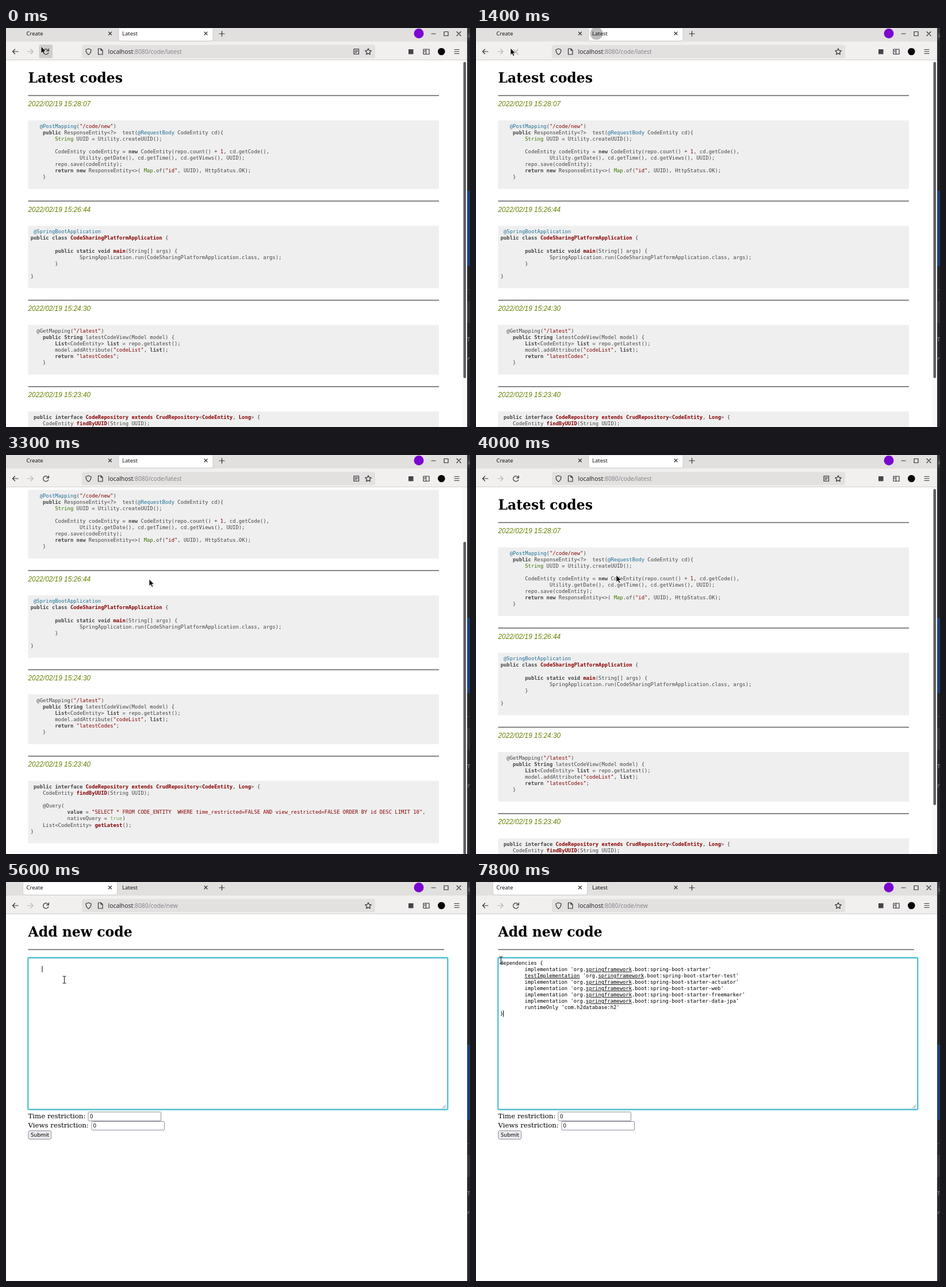
These frames come from a looping animation (807x694 px, 8000 ms). An HTML page:

```html
<!DOCTYPE html>
<html lang="en">
<head>
<meta charset="utf-8">
<title>Latest codes</title>
<style>
html, body { margin: 0; width: 100%; height: 100%; overflow: hidden; background: #fff; }
svg { display: block; width: 807px; height: 694px; }
text { white-space: pre; }
.ui { font: 9.45px "Noto Sans", "Open Sans", sans-serif; fill: #15141a; }
.url { font-size: 10.35px; fill: #85858a; }
.btn { font-size: 9.6px; fill: #000; }
.h1 { font: bold 23.5px "DejaVu Serif", serif; }
.label { font: 11.78px "DejaVu Serif", serif; }
.date { font: italic 11.85px "Liberation Sans", Arial, sans-serif; fill: #658200; }
.code { font: 8.86px "DejaVu Sans Mono", monospace; fill: #444; }
.area { fill: #000; }
.k, .t { font-weight: bold; }
.t, .s { fill: #800; }
.m { fill: #1f7199; }
.u { fill: #397300; }
.l { fill: #78a960; }
.w { text-decoration: underline wavy #e0202a 1px; text-decoration-skip-ink: none; text-underline-offset: 1px; }
.icon { fill: none; stroke: #333238; stroke-width: 1.2; stroke-linejoin: round; stroke-linecap: round; }
.field { fill: #fff; stroke: #8f8f9d; }
</style>
</head>
<body>
<svg viewBox="0 0 807 694">
  <rect width="807" height="694" fill="#fff"/>

  <g id="latest">
    <g id="posts"><text class="h1" x="38.5" y="94.5">Latest codes</text></g>
    <rect x="793" y="56" width="9" height="638" fill="#f9f9fa"/>
    <rect id="thumb" x="795.5" y="59" width="4.5" height="550" rx="2.2" fill="#5d5d62"/>
  </g>

  <g id="create">
    <text class="h1" x="38.5" y="94.5">Add new code</text>
    <path d="M38.5 117.6H762" stroke="#5c615e" stroke-width="1.5"/>
    <rect x="38.5" y="132" width="729.5" height="263.5" rx="1.5" fill="none" stroke="#b9f1f8" stroke-width="4.5"/>
    <rect x="38.5" y="132" width="729.5" height="263.5" rx="1.5" fill="#fff" stroke="#1fa5bc" stroke-width="1.4"/>
    <path d="M759 393.500l6-6m-3 6l3-3" stroke="#777" fill="none"/>
    <g id="pasted"></g>
    <rect id="caret" width="1" height="11"/>
    <text class="label" x="38.5" y="411">Time restriction:</text>
    <text class="label" x="38.5" y="427">Views restriction:</text>
    <rect class="field" x="143" y="400" width="126.500" height="15.500" rx="1.500"/>
    <rect class="field" x="149" y="416.500" width="126.500" height="15" rx="1.500"/>
    <text class="ui btn" x="146" y="411">0</text>
    <text class="ui btn" x="151.500" y="427">0</text>
    <rect x="38.800" y="432.600" width="40" height="14.800" rx="3" fill="#e9e9ed" stroke="#8f8f9d"/>
    <text class="ui btn" x="43" y="443">Submit</text>
  </g>

  <rect width="802" height="25" fill="#e2e0de"/>
  <rect y="23.500" width="802" height="32" fill="#f1f0ef"/>
  <path d="M0 55.500H802" stroke="#d0cfce"/>
  <path id="hover" d="M29 0H192V19q0 3.500-3.500 3.500H32.500q-3.500 0-3.500-3.500Z" fill="#cbc9c8"/>
  <path id="tab" d="M196 0H360V19q0 3.500-3.500 3.500H199.500q-3.500 0-3.500-3.500Z" fill="#fff" stroke="#c8c6c5" stroke-width=".8"/>
  <circle id="burst" cx="209.500" cy="9.500" fill="#a6a6a6"/>
  <text class="ui" x="35.500" y="13">Create</text>
  <text class="ui" x="202" y="13">Latest</text>
  <circle cx="718" cy="9.500" r="8.500" fill="#7a06cf"/>
  <g class="icon">
    <path d="M178.500 7l5 5m0-5l-5 5M345 7l5 5m0-5l-5 5M371 10h9m-4.500-4.500v9M740 10h7M762 6.500h7v7h-7zM784 6.500l7 7m0-7l-7 7"/>
  </g>

  <rect x="132" y="29.500" width="510" height="23" rx="3" fill="#e3e1e0"/>
  <text class="ui url" x="177.500" y="45"><tspan fill="#29292e">localhost</tspan><tspan id="path"></tspan></text>
  <rect id="press" x="57.500" y="29" width="23.500" height="23.500" rx="3"/>
  <g class="icon">
    <path d="M21 41H11.500m4-4l-4 4 4 4"/>
    <path d="M37.500 41H47m-4-4l4 4-4 4" stroke="#b5b4b5"/>
    <path id="reload" d="M73.800 39.500A4.700 4.700 0 1 0 73.800 43M74.300 36v3.800h-3.800"/>
    <path id="stop" d="M65 37.500l8 8m0-8l-8 8" stroke="#aaa"/>
    <path d="M143.500 36l4.500 1.700c0 4-1 6.700-4.500 8.800-3.500-2.100-4.500-4.800-4.500-8.800zM160.500 36h4.500l3 3v7h-7.500zM165 36v3h3"/>
    <path id="reader" d="M605 36.500h8.500v9H605zM607 39h4.500m-4.500 2h4.500m-4.500 2h2.500"/>
    <path d="M630 35.800l1.600 3.300 3.700.5-2.700 2.600.7 3.700-3.300-1.800-3.300 1.800.7-3.700-2.700-2.600 3.700-.5z"/>
    <path d="M726 37h10v8.500h-10zM730.500 37v8.500M727.800 39.500h1m-1 2h1M780 37.500h8m-8 3.500h8m-8 3.500h8"/>
  </g>
  <rect x="700" y="37" width="8.500" height="8.500" fill="#45444a"/>
  <circle cx="757.300" cy="41" r="6.300" fill="#08080a"/>

  <rect x="802" width="5" height="694" fill="#26282b"/>
  <path d="M802 0h5v22h-5zM802 475h5v38h-5z" fill="#34363a"/>
  <path d="M802 283h5v131h-5z" fill="#1c3f7d"/>
  <path d="M802 455h5" stroke="#44464a"/>
  <g class="code" style="fill:#8f9296"><text x="802.500" y="16">i</text><text x="802" y="545">T</text><text x="802" y="578">r</text></g>

  <path id="arrow" d="M0 0V12L2.800 9.500 4.700 13.800 6.800 12.900 4.900 8.700H8.500Z" fill="#111" stroke="#fff" stroke-width=".7"/>
  <path id="beam" d="M-3-6h2q1 0 1 1 0-1 1-1h2M0-5v10M-3 6h2q1 0 1-1 0 1 1 1h2" fill="none" stroke="#222" stroke-width="1.100"/>
</svg>

<script>
const $ = id => document.getElementById(id);
const PITCH = 11.07;

// [k keyword] [t title] [s string] [m annotation] [u built-in] [l literal] [w misspelt]
const mark = s => s.replace(/&/g, '&amp;').replace(/</g, '&lt;')
  .replace(/\[([ktsmulw]) (.*?)\]/g, '<tspan class="$1">$2</tspan>');
const codeLines = (src, x, y, cls = '') => src.split('\n').map((line, i) =>
  `<text class="code ${cls}" x="${x}" y="${y + i * PITCH}">${mark(line)}</text>`).join('');

const posts = [
['15:28:07', `   [m @PostMapping]([s "/code/new"])
    [k public] ResponseEntity<?>  test([m @RequestBody] CodeEntity cd){
        [u String] UUID = Utility.createUUID();

        CodeEntity codeEntity = [k new] CodeEntity(repo.count() + [s 1], cd.getCode(),
                Utility.getDate(), cd.getTime(), cd.getViews(), UUID);
        repo.save(codeEntity);
        [k return new] ResponseEntity<>( [u Map].of([s "id"], UUID), HttpStatus.OK);
    }
`],
['15:26:44', ` [m @SpringBootApplication]
[k public class] [t CodeSharingPlatformApplication] {

        [k public static void] [t main](String[] args) {
                SpringApplication.run(CodeSharingPlatformApplication.class, args);
        }

}
`],
['15:24:30', `  @GetMapping([s "/latest"])
    [k public String] latestCodeView(Model model) {
        [k List]<CodeEntity> [k list] = repo.getLatest();
        model.addAttribute([s "codeList"], [k list]);
        [k return] [s "latestCodes"];
    }
`],
['15:23:40', ` [k public interface] [t CodeRepository extends CrudRepository]<[t CodeEntity], [t Long]> {
    CodeEntity [t findByUUID](String UUID);

    @Query(
            [k value] = [s "SELECT * FROM CODE_ENTITY  WHERE time_restricted=FALSE AND view_restricted=FALSE ORDER BY id DESC LIMIT 10"],
            nativeQuery = [l true])
    List<CodeEntity> [t getLatest]();
}
`]];

let y = 117.6, html = '';
for (const [time, src] of posts) {
  const top = y + 43, h = src.split('\n').length * PITCH + 8.8;
  html += `<path d="M38.5 ${y}H753" stroke="#5c5e62" stroke-width="1.5"/>
    <text class="date" x="38.5" y="${y + 18.6}">2022/02/19 ${time}</text>
    <rect x="38.5" y="${top}" width="714.5" height="${h}" fill="#efefef"/>` + codeLines(src, 42.7, top + 13.3);
  y = top + h + 21;
}
$('posts').innerHTML += html;

const dep = (name, kind = 'implementation') =>
  `        ${kind} 'org.[w springframework].boot:spring-boot-starter${name}'`;
$('pasted').innerHTML = codeLines(['dependencies {', dep(''), dep('-test', '[w testImplementation]'),
  dep('-actuator'), dep('-web'), dep('-freemarker'), dep('-data-jpa'),
  "        runtimeOnly 'com.h2database:h2'", '}'].join('\n'), 42, 143.8, 'area');

// pointer: time, x, y
const track = [
  [0, 61, 32], [100, 60, 35], [1500, 60, 35], [1600, 78, 58], [1900, 295, 222], [2000, 322, 242],
  [2100, 300, 230], [2400, 132, 127], [2600, 230, 160], [3200, 230, 160], [3300, 249, 216],
  [3900, 249, 216], [4000, 244, 209], [4500, 244, 209], [4800, 106, 10], [5200, 106, 10],
  [5600, 101.5, 170], [5900, 101.5, 170], [6300, 66, 154], [6700, 37, 137], [6800, 42, 136], [6900, 43.5, 136]];

function pointer(t) {
  const i = track.findIndex(p => p[0] > t);
  if (i < 0) return track.at(-1).slice(1);
  const a = track[i - 1], b = track[i], f = (t - a[0]) / (b[0] - a[0]);
  return [1, 2].map(k => a[k] + (b[k] - a[k]) * f);
}

const show = (id, on) => $(id).style.display = on ? '' : 'none';
const move = (id, x, y) => $(id).setAttribute('transform', `translate(${x} ${y})`);

function draw(now) {
  const t = Math.floor(now % 8000 / 100) * 100;
  const within = (a, b) => t >= a && t < b;
  const creating = t >= 5100, scrolled = within(3300, 4000), pasted = t >= 7800;

  show('latest', !creating);
  show('create', creating);
  move('posts', 0, scrolled ? -100 : 0);
  move('thumb', 0, scrolled ? 92 : 0);
  move('tab', creating ? -166.5 : 0, 0);
  show('hover', within(4700, 5100));
  $('path').textContent = ':8080/code/' + (creating ? 'new' : 'latest');

  const loading = within(700, 1900);
  show('press', t < 700);
  $('press').setAttribute('fill', t < 400 ? '#cfcdcc' : '#bdbbba');
  show('stop', loading);
  show('reload', !loading);
  show('reader', !creating && !within(700, 1500));
  show('burst', within(1300, 1700));
  $('burst').setAttribute('r', Math.max(0, 11 + (t - 1400) / 25));
  $('burst').setAttribute('opacity', Math.max(0, .75 - Math.max(0, t - 1400) / 300));

  show('pasted', pasted);
  show('caret', t < 6000 || within(6800, 7200) || t >= 7500);
  move('caret', ...(pasted ? [47, 223.5] : t < 6800 ? [62.5, 146] : [41, 135]));

  const [px, py] = pointer(t), text = creating && py > 132;
  show('arrow', !text);
  show('beam', text);
  move(text ? 'beam' : 'arrow', px, py);
  requestAnimationFrame(loop);
}

const start = performance.now();
const loop = () => draw(performance.now() - start);
loop();
</script>
</body>
</html>
```
